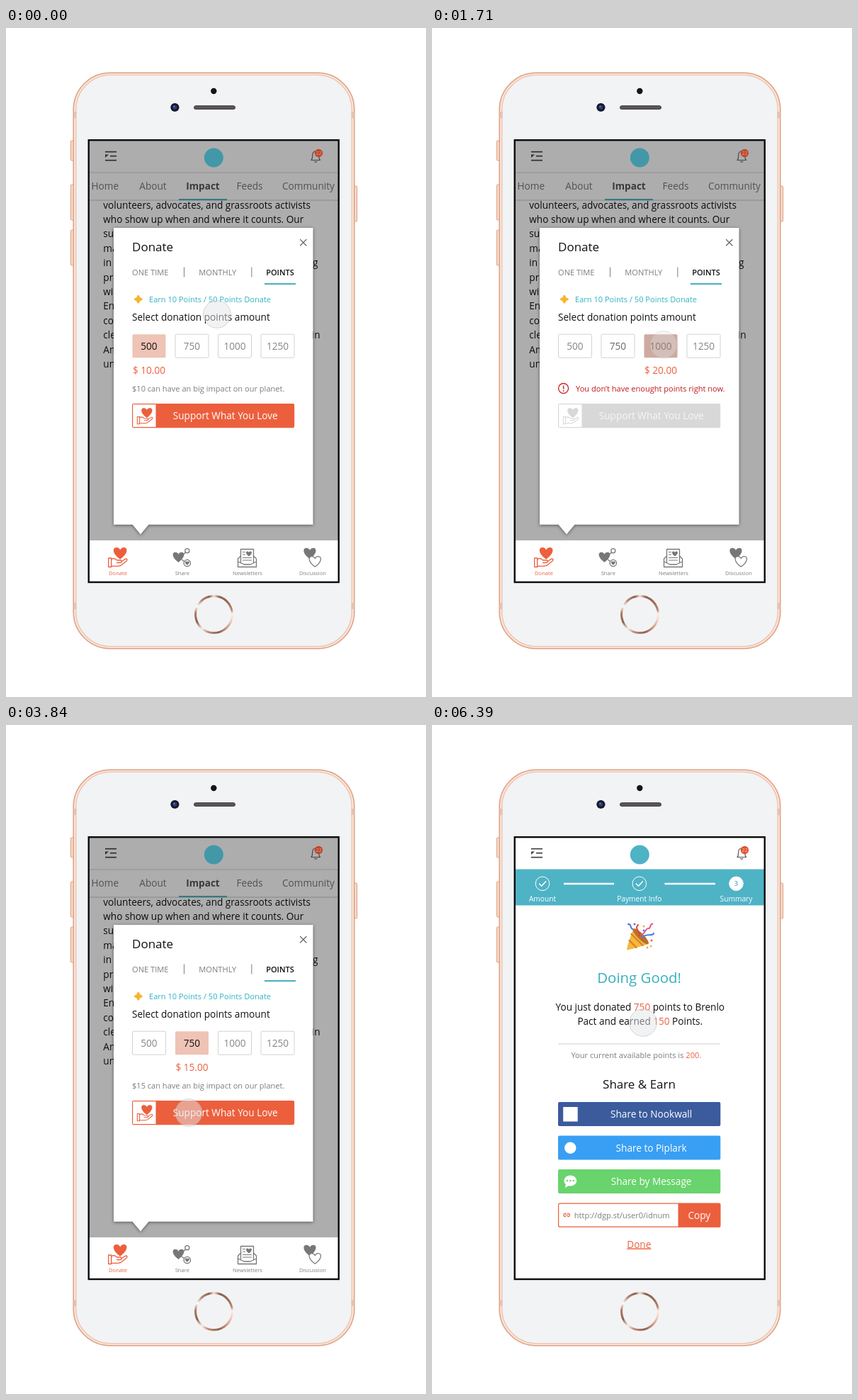
Animation, 593 px wide and 944 px high, one loop 6.42 s. Source, as an HTML page:

```html
<!DOCTYPE html>
<html lang="en">
<head>
<meta charset="utf-8">
<title>Donate with points</title>
<style>
html, body { margin: 0; width: 100%; height: 100%; overflow: hidden; background: #fff; }
svg { position: absolute; left: 0; top: 0; display: block; }
text { font-family: "Open Sans", "Noto Sans", sans-serif; white-space: pre; }
.ring { position: absolute; left: 266px; top: 800px; width: 55px; height: 55px; border-radius: 50%;
  background: conic-gradient(#f6e2d8 0deg, #8d5f4c 18deg, #9c6a56 50deg, #b98570 75deg, #fbf0ea 88deg,
    #f3d8ca 105deg, #d9a48c 130deg, #8f604c 165deg, #c08b74 198deg, #fbeee7 220deg, #8f5f4b 245deg,
    #b07a64 275deg, #fff 296deg, #b88a75 318deg, #8d5f4c 345deg, #f6e2d8 360deg); }
.ring::after { content: ""; position: absolute; inset: 3px; border-radius: 50%; background: #f2f3f5; }
</style>
</head>
<body>
<svg id="stage" width="593" height="944" viewBox="0 0 593 944"></svg>
<div class="ring"></div>
<script>
const LOOP = 6420;
const ORANGE = '#ec5f3d', TEAL = '#4eb3c5', GREY = '#7d7d7d';

// Drawing helpers
const text = (x, y, s, o = {}) =>
  `<text x="${x}" y="${y}" font-size="${o.size || 13.6}" fill="${o.fill || '#111'}" text-anchor="${o.at || 'start'}" font-weight="${o.weight || 400}"${o.under ? ' text-decoration="underline"' : ''}>${s}</text>`;
const mid = (x, y, s, o = {}) => text(x, y, s, { ...o, at: 'middle' });
const end = (x, y, s, o = {}) => text(x, y, s, { ...o, at: 'end' });
const rect = (x, y, w, h, fill, extra = '') =>
  `<rect x="${x}" y="${y}" width="${w}" height="${h}" fill="${fill}" ${extra}/>`;
const line = (x1, y1, x2, y2, color, w = 1) =>
  `<path d="M${x1} ${y1}L${x2} ${y2}" stroke="${color}" stroke-width="${w}" fill="none"/>`;
const circle = (x, y, r, fill, extra = '') =>
  `<circle cx="${x}" cy="${y}" r="${r}" fill="${fill}" ${extra}/>`;
const path = (d, color, w = 1.3, fill = 'none') =>
  `<path d="${d}" stroke="${color}" stroke-width="${w}" fill="${fill}" stroke-linecap="round" stroke-linejoin="round"/>`;
const group = (x, y, k, body) => `<g transform="translate(${x} ${y}) scale(${k})">${body}</g>`;
const heart = (x, y, k, fill, stroke = 'none') =>
  group(x, y, k, path('M0 6.3C-9 0 -8.5 -6.5 -4 -6.5C-2 -6.5 -.5 -5.3 0 -3.8C.5 -5.3 2 -6.5 4 -6.5C8.5 -6.5 9 0 0 6.3Z', stroke, 1.2 / k, fill));

const hand = (x, y, k, color) => group(x, y, k,
  heart(3.5, -6.5, 1.3, color) +
  path('M-13 0H-9V12.5H-13Z', color) +
  path('M-9 2C-6 -1 -3 1 -1 3H4C6 3 6 6.5 4 6.5H-1M5 5L10.5 1.4C13 .2 14.3 2.4 12.5 4L5 10C2.5 12 -4 11.3 -9 11.3', color));

function header(dim) {
  const ink = dim ? '#3a3a3a' : '#444';
  return `<g${dim ? ' style="filter:brightness(.85)"' : ''}>` +
    line(140, 174.7, 156, 174.7, ink, 1.7) + line(147, 180.7, 156, 180.7, ink, 1.7) +
    line(140, 186.7, 156, 186.7, ink, 1.7) + `<path d="M140 178.5H145L140 183Z" fill="${ink}"/>` +
    circle(293.3, 183, 13.5, TEAL) +
    path('M431 186.5H443.5C441.5 184.5 442 182 441.7 179C441.3 175.5 439.5 174 437.2 174C435 174 433 175.5 432.7 179C432.5 182 433 184.5 431 186.5ZM435.7 188.3C436.5 189.3 438 189.3 438.8 188.3', '#555', 1.2) +
    circle(441.4, 176.5, 5.7, '#e4512f') + mid(441.4, 179, '22', { size: 7, fill: '#f8c9bc' }) + '</g>';
}

// Amount area of the donate sheet, one version per selection
const AMOUNTS = ['500', '750', '1000', '1250'];
function amounts(id, pick, note, price, off) {
  let s = `<g id="${id}">` + rect(170, 426, 256, 144, '#fff');
  AMOUNTS.forEach((a, i) => {
    const x = 178.5 + i * 60.5, on = i === pick;
    s += rect(x, 432.2, 47, 33, on ? (off ? '#cfaaa0' : '#efc3b5') : '#fff', `rx="1.5" stroke="${on ? 'none' : '#d2d2d2'}"`);
    const fill = on ? (off ? '#5d4a46' : '#111') : off && i === 1 ? '#666' : '#858585';
    s += mid(x + 23.5, 454, a, { fill });
  });
  s += mid(202 + pick * 60.5, 488, price, { fill: ORANGE });
  if (off) {
    s += circle(185.6, 508.5, 7, 'none', 'stroke="#c92a2f" stroke-width="1.4"') +
      line(185.6, 504.5, 185.6, 509.6, '#c92a2f', 1.5) + circle(185.6, 512, .9, '#c92a2f') +
      text(203, 512.5, note, { size: 11.05, fill: '#c2191f' });
  } else s += text(178, 512.5, note, { size: 11.05, fill: GREY });
  const c = off ? '#d8d8d8' : ORANGE;
  return s + rect(178.6, 530.6, 228, 33, c, `rx="1.5" stroke="${c}" stroke-width="1.2"`) +
    rect(179.2, 531.2, 32.3, 31.8, '#fff') + hand(196, 548.5, .82, c) +
    mid(309.7, 552.4, 'Support What You Love', { fill: off ? '#f6f6f6' : '#fff' }) + '</g>';
}

function donate() {
  let s = rect(117, 158, 353, 625, '#fff');
  const lead = ['volunteers, advocates, and grassroots activists', 'who show up when and where it counts. Our',
    'su', 'ma', 'in', 'pr', 'wi', 'En', 'co', 'cle', 'Am', 'un'];
  lead.forEach((l, i) => s += text(137.3, 254.5 + i * 20.4, l));
  s += end(440.5, 336, 'g') + end(443.5, 438, 'in');
  s += rect(117, 158, 353, 85, '#fff') + line(117, 204, 470, 204, '#d5d5d5') + line(117, 243, 470, 243, '#c8c8c8');
  const nav = { fill: '#777' };
  s += text(120.5, 228, 'Home', nav) + text(188.3, 228, 'About', nav) +
    mid(278, 228, 'Impact', { fill: '#555', weight: 700 }) + text(325.5, 228, 'Feeds', nav) + text(390, 228, 'Community', nav);
  s += rect(244, 241, 68, 2.2, TEAL);
  s += rect(117, 158, 353, 565, '#000', 'opacity=".32"') + header(true);

  // Sheet
  s += '<path d="M152 282H433.5V700.7H201.5L190 714.5L178.5 700.7H152Z" fill="#fff" style="filter:drop-shadow(0 1px 2px rgba(0,0,0,.5))"/>';
  s += text(178, 314.6, 'Donate', { size: 17 }) + path('M415.5 298.5L424 307M424 298.5L415.5 307', '#666', 1.2);
  const tab = { size: 11.1, fill: GREY };
  s += text(178, 348.5, 'ONE TIME', tab) + text(272.3, 348.5, 'MONTHLY', tab) +
    mid(387, 348.5, 'POINTS', { size: 11, weight: 600 });
  s += line(251.5, 337.5, 251.5, 351.5, '#888', 1.1) + line(346.8, 337.5, 346.8, 351.5, '#888', 1.1) + rect(365, 360, 44, 2.2, TEAL);
  s += group(186.8, 382.7, 1, '<ellipse rx="2.5" ry="6" fill="#f6b52c"/><ellipse rx="6" ry="2.5" fill="#f6b52c"/>' + circle(0, 0, 3.5, '#f6b52c'));
  s += text(202, 387, 'Earn 10 Points / 50 Points Donate', { size: 11.05, fill: '#2fb3c0' }) +
    text(178, 413, 'Select donation points amount');
  s += amounts('pick750', 1, '$15 can have an big impact on our planet.', '$ 15.00') +
    amounts('pick500', 0, '$10 can have an big impact on our planet.', '$ 10.00') +
    amounts('pick1000', 2, 'You don’t have enought points right now.', '$ 20.00', true);

  // Tab bar
  const g = '#777';
  s += rect(117, 723, 353, 60, '#fff') + hand(157.7, 748, 1, ORANGE);
  s += heart(243.5, 747, 1.1, g) + line(249, 744, 253.5, 740, g, 1.3) + line(248, 750, 251.5, 752.5, g, 1.3) +
    circle(255.8, 737.7, 3, '#fff', `stroke="${g}" stroke-width="1.3"`) +
    circle(255.8, 755, 4.7, '#fff', `stroke="${g}" stroke-width="1.3"`) + heart(255.8, 755.2, .42, g);
  s += path('M331.5 745L327.5 749V760.5H353.5V749L349.5 745', g) + path('M331.5 754V735.5H349.5V754', g) +
    path('M327.5 753L336 757H345L353.5 753', g) + heart(343, 742, .55, g) +
    path('M334.5 739.5H337.5M334.5 743H337.5M334.5 747.5H346.5M334.5 751H346.5', g, 1.2);
  s += heart(429, 741.5, 1.2, g) + heart(436.3, 753, 1.15, '#fff', g);
  const label = { size: 7.6, fill: GREY };
  return s + mid(158, 772.2, 'Donate', { size: 7.6, fill: ORANGE }) + mid(248.8, 772.2, 'Share', label) +
    mid(341, 772.2, 'Newsletters', label) + mid(433, 772.2, 'Discussion', label);
}

function steps(current) {
  let s = rect(117, 158, 353, 625, '#fff') + header(false) + rect(117, 203.5, 353, 51, TEAL);
  s += line(186, 224, 257, 224, '#fff', 2.4) + line(328.5, 224, 400, 224, '#fff', 2.4);
  [[156, 'Amount'], [292.8, 'Payment Info'], [429.5, 'Summary']].forEach(([x, name], i) => {
    const now = i === current;
    s += circle(x, 223.8, 9.8, now ? '#fff' : 'none', 'stroke="#fff" stroke-width="1"');
    s += i < current ? path(`M${x - 4.5} 224L${x - 1.3} 227.2L${x + 4.7} 220.8`, '#fff', 1.5)
      : mid(x, 227.2, i + 1, { size: 9.3, fill: now ? TEAL : '#e2f4f7', weight: now ? 600 : 400 });
    s += mid(x, 249, name, { size: 10.2, fill: '#fff' });
  });
  return s;
}

function payment() {
  return steps(1) +
    text(139.7, 291, 'Your Selected Donation Points Amount:') + end(445.2, 291, '750', { fill: ORANGE }) +
    text(139.7, 325, 'The Dollar Value:') + text(395.3, 325, '$') + end(445.2, 325, '15.00') +
    end(444.8, 356.3, 'Edit', { size: 11.1, fill: GREY }) + line(139.5, 380, 445.7, 380, '#d9d9d9') +
    rect(139.7, 405.3, 306, 41, ORANGE, 'rx="2"') + mid(292.7, 430.2, 'Donate Now', { fill: '#fff' }) +
    rect(140, 471.7, 305.4, 41, '#fff', 'rx="2" stroke="#d8785c" stroke-width="1.2"') +
    mid(292.7, 496.5, 'Previous Step', { fill: ORANGE }) +
    mid(292.5, 546, 'Cancel', { fill: GREY, under: true });
}

function popper() {
  return '<path d="M284 287.5C290 286 306 302 305.5 309C299 311 284 316 275.5 317.5C274 316 281 297 284 287.5Z" fill="#f6b73c"/>' +
    path('M281.5 295L297.5 311M278.6 304L288.5 314', '#d9822b', 2.4) +
    '<ellipse cx="294.8" cy="298.3" rx="4.3" ry="15" transform="rotate(-45 294.8 298.3)" fill="#b9702c"/>' +
    path('M293 297C294 290 285 288 291 282', '#e0453a', 2) +
    path('M297 300C302 293 311 299 313 294', '#4a83e0', 2.2) +
    path('M296 296C304 292 300 287 306 287C309 287 307 281 311.5 280.5', '#e85a8a', 2) +
    path('M277 281C282 280 279 286 283 288', '#4a6fe0', 2) +
    [[299, 284, '#f4a93a'], [286, 281, '#7b61d9'], [310, 304, '#e85a4a'], [304, 314, '#f4a93a'], [309, 312, '#f0b04a'], [299, 290, '#4a83e0']]
      .map(([x, y, c]) => circle(x, y, 1.5, c)).join('');
}

function share(y, color, name, icon) {
  return rect(178, y, 229.3, 34, color, 'rx="2"') + mid(309.6, y + 22, name, { fill: '#fff' }) + icon;
}

function summary() {
  const hot = s => `<tspan fill="${ORANGE}">${s}</tspan>`;
  return steps(2) + popper() +
    mid(292.6, 363.6, 'Doing Good!', { size: 20.4, fill: '#38b0be' }) +
    mid(293.8, 403.4, `You just donated ${hot('750')} points to Brenlo`) +
    mid(293.8, 422.6, `Pact and earned ${hot('150')} Points.`) +
    line(178, 450, 407, 450, '#cfcfcf') +
    mid(288.4, 470, `Your current available points is ${hot('200')}.`, { size: 11.1, fill: GREY }) +
    mid(292.5, 513, 'Share &amp; Earn', { size: 17 }) +
    share(532, '#3b5b9d', 'Share to Nookwall', rect(185.2, 539, 20.5, 20.5, '#fff')) +
    share(579.5, '#389ff4', 'Share to Piplark', circle(195.3, 596.7, 8.2, '#fff')) +
    share(627, '#69d36d', 'Share by Message',
      '<ellipse cx="195.3" cy="643" rx="9" ry="7.6" fill="#fff"/><path d="M189 647L188 653L195 649Z" fill="#fff"/>' +
      [191, 195.3, 199.6].map(x => circle(x, 643, 1.2, '#69d36d')).join('')) +
    rect(178.6, 675.2, 228.2, 33, '#fff', `rx="2" stroke="${ORANGE}" stroke-width="1.2"`) + rect(347.5, 675, 59.7, 33.5, ORANGE) +
    path('M189 689.4H188C185.2 689.4 185.2 693.6 188 693.6H189M191.3 689.4H192.3C195.1 689.4 195.1 693.6 192.3 693.6H191.3M188.4 691.5H192', ORANGE, 1.1) +
    text(200.8, 695.7, 'http://dgp.st/user0/idnum', { size: 11.05, fill: GREY }) + mid(377.3, 696.8, 'Copy', { fill: '#fff' }) +
    mid(292.3, 737.5, 'Done', { fill: ORANGE, under: true });
}

function phone() {
  const edge = 'stroke="#dea68b" stroke-width="1.2"';
  const keys = [[91.5, 159, 28], [91.5, 221, 50], [91.5, 285, 50], [490.5, 223, 50]]
    .map(([x, y, h]) => rect(x, y, 5, h, '#f9dfd1', `rx="1.5" ${edge}`)).join('');
  const bands = [[95.5, 118], [95.5, 811], [487.6, 118], [487.6, 811]]
    .map(([x, y]) => rect(x, y, 4, 9, '#e5c3b3')).join('');
  return keys + rect(95.2, 63.2, 396.6, 812.6, '#fbe3d7', 'rx="52" stroke="#dca083" stroke-width="1.5"') +
    rect(98.8, 66.4, 389.4, 806.2, '#f2f3f5', 'rx="49" stroke="#ecc4b0" stroke-width="1.3"') + bands +
    circle(293.3, 89, 4.2, '#151515') + circle(238.4, 112, 6.1, '#17182a') + circle(238.4, 112, 3, '#2c3a78') +
    circle(237.3, 110.8, 1, '#7b8fd0') + rect(265.5, 109.8, 58, 4.8, '#5c5557', 'rx="2.4" stroke="#3b3638" stroke-width="1"');
}

document.getElementById('stage').innerHTML =
  '<clipPath id="screen"><rect x="117" y="158" width="353" height="625"/></clipPath>' + phone() +
  `<g clip-path="url(#screen)"><g>${donate()}</g><g id="payment">${payment()}</g><g id="summary">${summary()}</g></g>` +
  rect(116.75, 158.2, 353, 623.8, 'none', 'stroke="#0c0c0c" stroke-width="2.4"') +
  '<g id="tap">' + circle(0, 0, 19.3, '#e4e5e8') + circle(0, 0, 19.3, 'none', 'stroke="#a9a9a9" stroke-width="1"') + '</g>';

// Motion tables, times in ms
const run = (id, frames) => document.getElementById(id).animate(frames, { duration: LOOP, iterations: Infinity });

const fade = (id, rows) => run(id, rows.map(([t, opacity]) => ({ offset: t / LOOP, opacity })));

const PATH = [
  [0, 298, 404, .5], [60, 298, 404, .5], [600, 262, 449, .5], [720, 262, 449, .34], [840, 262, 449, .34],
  [1320, 327, 447, .4], [1440, 327, 447, .34], [1860, 327, 447, .34], [2340, 262, 451, .4],
  [2460, 262, 451, .34], [3060, 262, 451, .34], [3540, 258, 547, .5], [4300, 258, 547, .5],
  [4740, 262, 493, .5], [4950, 262, 493, .5], [5430, 298, 420, .5], [LOOP, 298, 420, .5]
];
run('tap', PATH.map(([t, x, y, opacity]) => ({
  offset: t / LOOP, transform: `translate(${x}px, ${y}px)`, opacity, easing: 'ease-in-out'
})));

fade('pick500', [[0, 1], [660, 1], [810, 0], [LOOP, 0]]);
fade('pick1000', [[0, 0], [1440, 0], [1620, 1], [2430, 1], [2610, 0], [LOOP, 0]]);
fade('payment', [[0, 0], [3850, 0], [3960, 1], [LOOP, 1]]);
fade('summary', [[0, 0], [5640, 0], [5820, 1], [LOOP, 1]]);
</script>
</body>
</html>
```
